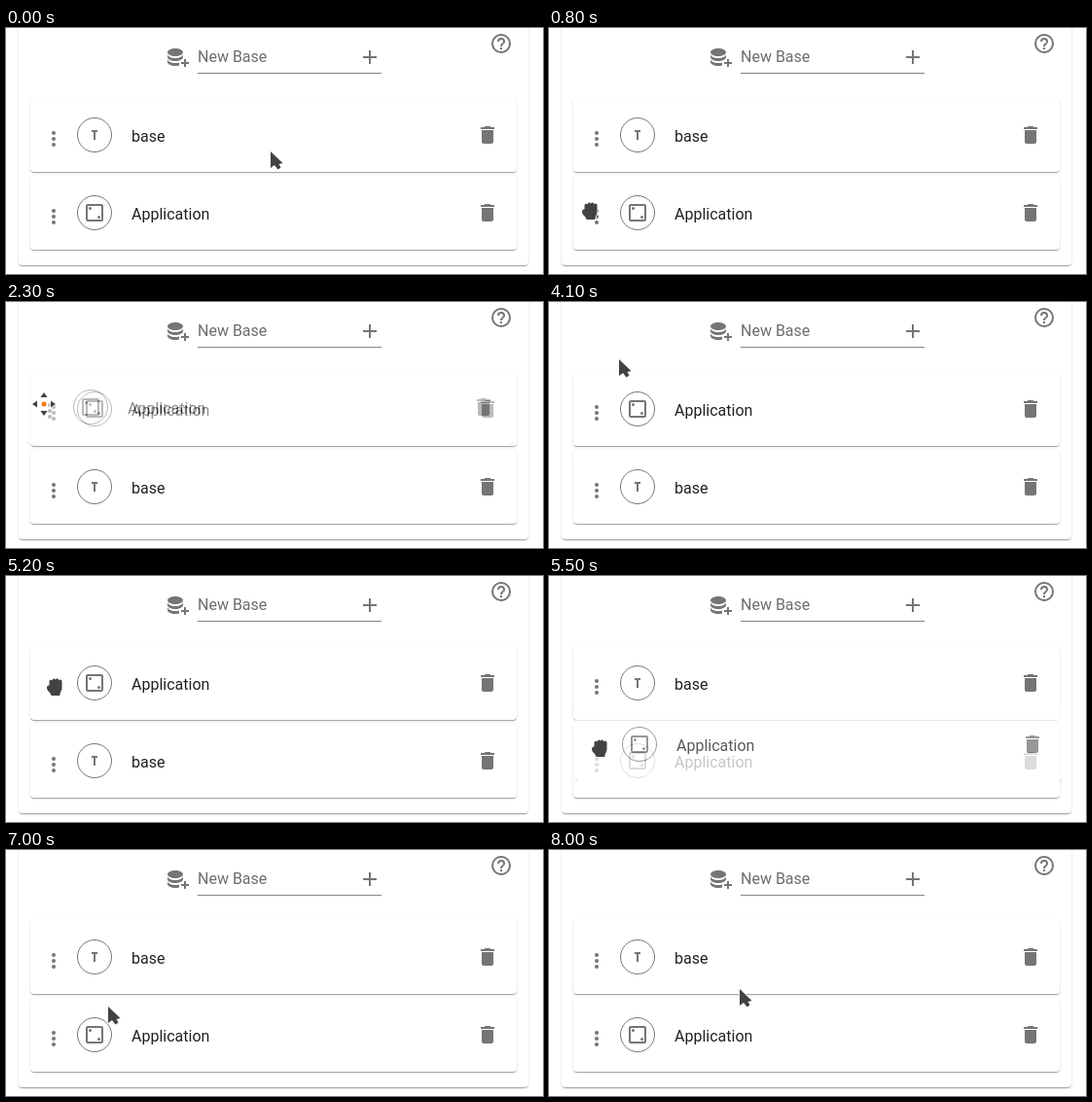
Recreate the animation shown at these times as an HTML page. Size 552 by 253 pixels, loop 8.1 s.

```html
<!DOCTYPE html>
<html lang="en">
<head>
<meta charset="utf-8">
<title>Drag to reorder</title>
<style>
  html, body { margin: 0; width: 100%; height: 100%; overflow: hidden; background: #fff; }
  #stage { position: relative; width: 552px; height: 253px; overflow: hidden; font: 16px/19px Roboto, sans-serif; }
  #stage > *, span { position: absolute; left: 0; top: 0; }
  .card {
    background: #fff; border-radius: 4px;
    box-shadow: 0 2px 1px -1px rgba(0,0,0,.2), 0 1px 1px rgba(0,0,0,.14), 0 1px 3px rgba(0,0,0,.12);
  }
  #stage > .panel { left: 13px; top: -20px; width: 524px; height: 264px; }
  #stage > .row { left: 25px; top: 72px; width: 500px; height: 76px; }
  .row span { left: 104px; top: 30px; color: #212121; }
  #stage > .field { left: 197px; top: 20px; width: 189px; height: 26px; color: #6c6c6c; border-bottom: 1px solid #858585; }
  #ghost { clip-path: inset(0); }
  svg { display: block; fill: #757575; }
  .ring { fill: none; stroke: #757575; }
  .cursor { fill: #424242; stroke: #fff; stroke-width: 1.5; paint-order: stroke; stroke-linejoin: round; }
</style>
</head>
<body>
<div id="stage">
  <div class="card panel"></div>
  <div class="field">New Base</div>
  <svg width="552" height="70">
    <path transform="translate(165 18)" d="M9 3C4.58 3 1 4.79 1 7s3.58 4 8 4 8-1.79 8-4-3.58-4-8-4M1 9v3c0 2.21 3.58 4 8 4s8-1.79 8-4V9c0 2.21-3.58 4-8 4s-8-1.79-8-4m0 5v3c0 2.21 3.58 4 8 4 1.41 0 2.79-.19 4-.54v-3c-1.21.35-2.59.54-4 .54-4.42 0-8-1.79-8-4m17 0v3h-3v2h3v3h2v-3h3v-2h-3v-3z"/>
    <path transform="translate(362 18)" d="M19 13h-6v6h-2v-6H5v-2h6V5h2v6h6z"/>
    <g transform="translate(509 16)">
      <circle r="9" class="ring" stroke-width="2"/>
      <path d="M-1 6h2V4h-2zM0-6a4 4 0 0 0-4 4h2a2 2 0 0 1 4 0C2 0-1-.25-1 3h2C1 .75 4 .5 4-2a4 4 0 0 0-4-4z"/>
    </g>
  </svg>
  <div class="card row" id="base"></div>
  <div class="card row" id="app"></div>
  <div class="card row" id="ghost"></div>
  <svg width="552" height="253">
    <path id="arrow" class="cursor" d="M0 0V17L4 14 7.500 18.500 10.500 16.500 8.500 13 12.500 12z"/>
    <path id="hand" class="cursor" d="M-5.500-5.500c0-2 2.500-2.400 3.200-.9 0-2.700 3-2.800 3.300-.6.4-2 3.100-1.800 3.200.4.7-1.600 3.300-1.200 3.300 1V1c0 3-2 4-2.200 8H-3.500C-4 5.500-8 4.500-8 1c0-2 1-2.800 2.500-2.500z"/>
    <g id="move" class="cursor"></g>
  </svg>
</div>
<script>
const $ = id => document.getElementById(id);
const LOOP = 8100, STEP = 100, SLOT = 80, SWAP_DISTANCE = 45, FADE = 300;

const titleGlyph = '<path d="M63 33h6v2h-2v8h-2v-8h-2z"/>';
const diceGlyph = `<rect x="58" y="30" width="16" height="16" rx="1" class="ring" stroke-width="2"/>
  <circle cx="61.5" cy="33.5" r="1.5"/><circle cx="70.5" cy="42.5" r="1.5"/>`;
const rowMarkup = (glyph, label) => `<span>${label}</span><svg width="500" height="76">
  ${[36, 42, 48].map(y => `<circle cx="24" cy="${y}" r="2"/>`).join('')}
  <circle cx="66" cy="38" r="17.5" class="ring"/>${glyph}
  <path transform="translate(458 26)" d="M6 19c0 1.1.9 2 2 2h8c1.1 0 2-.9 2-2V7H6zM19 4h-3.500l-1-1h-5l-1 1H5v2h14z"/>
</svg>`;
$('base').innerHTML = rowMarkup(titleGlyph, 'base');
$('app').innerHTML = $('ghost').innerHTML = rowMarkup(diceGlyph, 'Application');
$('move').innerHTML = [0, 90, 180, 270].map(angle =>
  `<path transform="translate(1 -1) rotate(${angle})" d="M0-12 3.500-7H-3.500z"/>`).join('') +
  '<circle cx="1" cy="-1" r="2.5" fill="#f57900"/>';

// Cursor travel: start, end, destination, sideways bend
const origin = [272, 127];
const moves = [
  [100, 800, 42, 188, -20],
  [1100, 1500, 38, 106, 5],
  [3300, 3500, 74, 55, 0],
  [4000, 4600, 50, 114, 0],
  [5200, 5500, 52, 177, 0],
  [6100, 6300, 55, 174, 0],
  [6800, 7300, 196, 138, 0],
  [7800, 8000, 196, 143, 0]
];
const drags = [
  { reach: 700, grab: 1100, drop: 2300, leave: 3400, home: SLOT },
  { reach: 4500, grab: 5200, drop: 6300, leave: 6900, home: 0 }
];

const clamp = v => Math.min(1, Math.max(0, v));
const smooth = f => f * f * (3 - 2 * f);

function cursorAt(t) {
  let [x, y] = origin;
  for (const [from, to, toX, toY, bend] of moves) {
    const f = smooth(clamp((t - from) / (to - from)));
    x += (toX - x) * f + bend * Math.sin(Math.PI * f);
    y += (toY - y) * f;
  }
  return [x, y];
}

function dragOffset(drag, t) {
  const [x0, y0] = cursorAt(drag.grab);
  const [x, y] = cursorAt(Math.min(t, drag.drop));
  return [x - x0, y - y0];
}

const place = (id, x, y) => $(id).style.transform = `translate(${Math.round(x)}px, ${Math.round(y)}px)`;

function draw(now) {
  const t = Math.floor(now % LOOP / STEP) * STEP;

  const started = drags.filter(d => t >= d.grab);
  const swaps = started.filter(d => Math.abs(dragOffset(d, t)[1]) > SWAP_DISTANCE).length;
  const appY = swaps % 2 ? 0 : SLOT;
  place('app', 0, appY);
  place('base', 0, SLOT - appY);

  const drag = started.at(-1);
  $('ghost').style.opacity = !drag ? 0 : t < drag.drop ? .75 : .5 * clamp(1 - (t - drag.drop) / FADE);
  if (drag) {
    const [dx, dy] = dragOffset(drag, t);
    place('ghost', dx, drag.home + dy);
  }

  const holding = drags.find(d => t >= d.reach && t < d.leave);
  const shape = !holding ? 'arrow' : t < holding.drop ? 'hand' : 'move';
  for (const id of ['arrow', 'hand', 'move']) $(id).style.display = id === shape ? '' : 'none';
  place(shape, ...cursorAt(t));
}

const start = performance.now();
(function tick() {
  draw(performance.now() - start);
  requestAnimationFrame(tick);
})();
</script>
</body>
</html>
```
